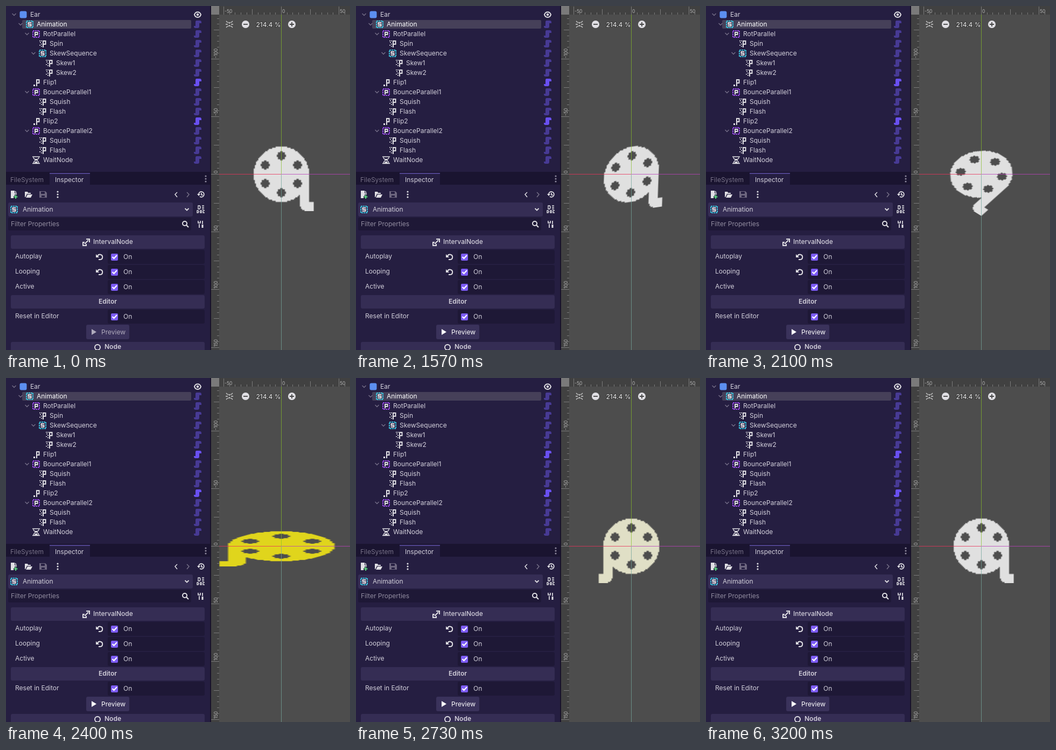
Write an HTML page with a canvas that moves like this. It is 639 by 639 pixels and loops after 4.23 s.

```html
<!DOCTYPE html>
<html>
<head>
<meta charset="utf-8">
<style>
html, body { margin: 0; width: 100%; height: 100%; overflow: hidden; background: #251e41 }
canvas, svg { position: absolute; left: 0; top: 0 }
text { font: 12px Inter, "Noto Sans", sans-serif; fill: #d3d0db; white-space: pre }
.ruler { font-size: 8.6px; fill: #b4b4b4 }
.bold { font-weight: 600 }
</style>
</head>
<body>
<canvas id="stage" width="639" height="639"></canvas>
<svg id="ui" width="639" height="639" fill="none"></svg>
<script>
const LIGHT = '#e0dfe4', BAR = '#352d54', FIELD = '#1e1836', DIM = '#767087';
const rect = (x, y, w, h, fill, r = 0) => `<rect x="${x}" y="${y}" width="${w}" height="${h}" rx="${r}" fill="${fill}"/>`;
const text = (x, y, s, attrs = '') => `<text x="${x}" y="${y + 4}" ${attrs}>${s}</text>`;
const at = (x, y, body) => `<g transform="translate(${x} ${y})">${body}</g>`;
const line = (d, color = LIGHT, w = 1.5) => `<path d="${d}" stroke="${color}" stroke-width="${w}"/>`;
const shape = (d, color = LIGHT) => `<path d="${d}" fill="${color}"/>`;
const dots = (x, y, color) => [-5, 0, 5].map(d => `<circle cx="${x}" cy="${y + d}" r="1.6" fill="${color}"/>`).join('');

// Icons, each centred on 0,0
const letterP = line('M1-6V7M1-5H5.5V1H1', LIGHT, 2);
const frame = color => `<rect x="-6" y="-6" width="12" height="12" stroke="${color}" stroke-width="2" stroke-dasharray="3 1"/>`;
const icons = {
  root: rect(-6.5, -6.5, 13, 13, '#5c8ff0', 3),
  seq: frame('#3cc3dc') + line('M3.5-3H-2.5V0H2.5V3H-3.5', LIGHT, 2),
  par: frame('#9448e0') + line('M-2-4V4.5M-2-3H2.5V1H-2', LIGHT, 2),
  tween: letterP + [[-6, -6], [-3, -6], [-5, -3], [-3, 0], [-6, 2], [-3, 4]].map(p => rect(...p, 2, 1.5, LIGHT)).join(''),
  set: letterP + rect(-5, 4, 3, 3, LIGHT),
  wait: line('M-7-6H7M-7 6.5H7') + line('M-5-5C-5-1-1-1-1 0S-5 2-5 6M5-5C5-1 1-1 1 0S5 2 5 6', LIGHT, 1.3) + shape('M-3-2H3L0 1ZM-4 6L0 2 4 6Z'),
  script: c => shape('M-2-7H4Q7-7 7-4V-2H3V4Q3 7 0 7H-4Q-7 7-7 4V3H-4V-4Q-4-7-2-7Z', c),
  eye: line('M-6 0C-4-6.5 4-6.5 6 0C4 6.5-4 6.5-6 0Z', LIGHT, 2) + `<circle r="2.3" fill="${LIGHT}"/>`,
  reset: line('M-4-1A4.7 4.7 0 1 1 1 5H-2', LIGHT, 2) + shape('M-7-5V1H-1Z'),
  chevron: (c, w) => line('M-3.5-2L0 1.5 3.5-2', c, w)
};

function tree() {
  const rows = [
    [0, 'root', 'Ear', 1], [1, 'seq', 'Animation', 1], [2, 'par', 'RotParallel', 1], [3, 'tween', 'Spin'],
    [3, 'seq', 'SkewSequence', 1], [4, 'tween', 'Skew1'], [4, 'tween', 'Skew2'], [2, 'set', 'Flip1'],
    [2, 'par', 'BounceParallel1', 1], [3, 'tween', 'Squish'], [3, 'tween', 'Flash'], [2, 'set', 'Flip2'],
    [2, 'par', 'BounceParallel2', 1], [3, 'tween', 'Squish'], [3, 'tween', 'Flash'], [2, 'wait', 'WaitNode']
  ];
  return rect(30, 26, 314, 16, '#464059', 2) + rows.map(([depth, icon, name, open], i) => {
    const x = 32 + depth * 12, y = 16 + i * 18;
    return (open ? at(x - 17, y, icons.chevron('#77718a', 1.3)) : '') + at(x, y, icons[icon])
      + text(x + 13, y, name, i == 1 ? 'style="fill:#fff"' : '')
      + at(356, y, i ? icons.script(icon == 'set' ? '#6950f2' : '#473a94') : icons.eye);
  }).join('');
}

function toolbar() {
  return rect(0, 308, 380, 24, '#1a1430') + rect(81, 310, 75, 22, '#251e41') + rect(81, 310, 75, 2, '#51448f')
    + text(8, 323, 'FileSystem', `style="fill:${DIM}"`) + text(91, 323, 'Inspector') + dots(371, 321, '#8b869b')
    + at(15, 350, shape('M-6-7H1V-2H5V0H1V3H-1V7H-6ZM2-7L5-3H2Z') + line('M3 1V8M-.5 4.5H6.5', '#5bd07b', 2.2))
    + at(42, 350, shape('M-7-5H-2L-1-3H4V-1H-3L-6 5H-7ZM-2 0H7L4 6H-5Z'))
    + at(69, 350, shape('M-7-6H4L7-3V6H-7ZM-4-5V-1H3V-5ZM-3 2V5H3V2Z', '#6d667f'))
    + dots(96, 350, LIGHT)
    + line('M318 346L314 350 318 355') + line('M336 346L340 350 336 355', DIM)
    + at(362, 350, line('M-4-1A5 5 0 1 1-2 4M1-3V1H4', LIGHT, 1.7) + shape('M-7-1H-1L-4 3Z'))
    + rect(4, 365, 343, 26, BAR, 3) + at(15, 378, icons.seq) + text(31, 378, 'Animation')
    + at(336, 378, icons.chevron(LIGHT, 1.8))
    + at(362, 378, line('M-5-7V-1H-2Q0-4-2-7ZM2-7H6M2-4H6M2-1H6', LIGHT, 1.4)
      + line('M-7 2V6H-5Q-3 4-5 2ZM1 2H-1V6H1ZM7 2H4V6H7', LIGHT, 1.4))
    + rect(4, 393, 340, 24, FIELD, 3) + text(9, 405, 'Filter Properties', 'style="fill:#928da1"')
    + at(333, 405, `<circle cx="-1" cy="-1" r="4" stroke="${LIGHT}" stroke-width="2"/>` + line('M2 2L6 6', LIGHT, 2.2))
    + at(362, 405, line('M-3 0V7M3-6V0M-5-6V-2H-1V-6', LIGHT, 1.7) + line('M3 1V7', LIGHT, 3));
}

function property(y, name, reset) {
  return text(17, y, name) + (reset ? at(174, y + 1, icons.reset) : '')
    + rect(189, y - 12, 180, 26, FIELD, 3) + rect(195, y - 5, 13, 13, '#7d5cf6', 2)
    + line(`M197.5 ${y + 1}L200.5 ${y + 4} 206 ${y - 2}`, '#fff', 2.2) + text(218, y + 1, 'On');
}

function inspector() {
  const header = y => rect(9, y, 360, 25, BAR, 3);
  return header(426) + at(149, 438, line('M-3 4L4-3M0-5H6V1', LIGHT, 2) + line('M-3 1H-6V7H0V4', LIGHT, 2))
    + text(162, 438, 'IntervalNode', 'style="font-weight:500"')
    + property(465, 'Autoplay', 1) + property(493, 'Looping', 1) + property(521, 'Active')
    + header(537) + text(189, 549, 'Editor', 'class="bold" text-anchor="middle"')
    + property(576, 'Reset in Editor')
    + rect(149, 592, 80, 27, '#3a325b', 3)
    + `<g id="preview">${shape('M159 600L168 605.5 159 611Z', 'inherit')}${text(177, 606, 'Preview', 'style="fill:inherit"')}</g>`
    + header(624) + `<circle cx="170" cy="634" r="5" stroke="${LIGHT}" stroke-width="2"/>`
    + text(183, 633, 'Node', 'class="bold"');
}

const OX = 511.5, OY = 312.5, UNIT = 2.144;

function rulers() {
  const back = '#414141', mark = '#7a7a7a';
  let out = rect(381, 0, 258, 16, back) + rect(381, 0, 15, 639, back) + rect(381, 0, 15, 16, mark);
  for (let v = -145; v <= 155; v += 5) {
    const len = v % 50 == 0 ? 15 : v % 25 == 0 ? 10 : 4;
    const x = Math.floor(OX + v * UNIT), y = Math.floor(OY + v * UNIT);
    if (x > 396 && x < 639) {
      out += rect(x, 16 - len, 1, len, mark);
      if (len == 15) out += text(x + 2, 9, v, 'class="ruler"');
    }
    if (y > 16 && y < 639) {
      out += rect(396 - len, y, len, 1, mark);
      if (len == 15) out += `<text class="ruler" transform="translate(393 ${y - 1}) rotate(-90)">${v}</text>`;
    }
  }
  return out;
}

function viewport() {
  const button = (x, d) => `<circle cx="${x}" cy="34" r="7" fill="${LIGHT}"/>` + line(d, '#444', 1.8);
  return rect(396, 312, 115, 1, 'rgba(232,50,90,.8)') + rect(512, 312, 127, 1, 'rgba(185,65,185,.8)')
    + rect(511, 16, 1, 296, 'rgba(135,190,40,.7)') + rect(511, 312, 1, 327, 'rgba(115,165,155,.75)') + rulers()
    + at(415, 34, line('M-6-6L-3-3M6-6L3-3M-6 6L-3 3M6 6L3 3', '#d0d0d0', 1.3)
      + line('M-2-4L0-2 2-4M-2 4L0 2 2 4M-7 0H-3M3 0H7', '#d0d0d0', 1.3))
    + button(445, 'M441 34H449') + button(531, 'M527 34H535M531 30V38')
    + text(487.5, 35, '214.4 %', 'text-anchor="middle" style="fill:#f2f2f2;stroke:#333;stroke-width:2;paint-order:stroke"');
}

document.getElementById('ui').innerHTML =
  tree() + toolbar() + inspector() + rect(379, 0, 2, 639, '#181229') + viewport();

// Pixel sprite of the film reel, 64 x 64 with its pivot in the middle
const sprite = document.createElement('canvas');
sprite.width = sprite.height = 64;
const pen = sprite.getContext('2d');
const holes = [[0, -16], [14, -8], [14, 8], [0, 16], [-14, 8], [-14, -8]];

function inReel(x, y) {
  if (holes.some(([hx, hy]) => Math.hypot(x - hx, y - hy) < 3.7)) return false;
  if (Math.hypot(x, y) < 24) return true;
  if (y < 0 || y > 32 || x < 16) return false;
  if (y < 24) return x < 24;
  return x < 28 && (x > 22 || y < 26 || Math.hypot(x - 22, y - 26) < 6);
}

function paintSprite(color) {
  pen.clearRect(0, 0, 64, 64);
  pen.fillStyle = color;
  for (let y = 0; y < 64; y++)
    for (let x = 0; x < 64; x++)
      if (inReel(x - 31.5, y - 31.5)) pen.fillRect(x, y, 1, 1);
}

const LOOP = 4230, HOVER = 770, SPIN = 1396, SPIN_LEN = 980, BOUNCE = 2395, BOUNCE_LEN = 500, REST = 3200;
const ctx = document.getElementById('stage').getContext('2d');
const preview = document.getElementById('preview');
const cubicInOut = p => p < .5 ? 4 * p ** 3 : 1 - 4 * (1 - p) ** 3;

function pose(t) {
  const p = { angle: 0, skew: 0, sx: 1, sy: 1, flash: 0 };
  const spin = (t - SPIN) / SPIN_LEN, bounce = (t - BOUNCE) / BOUNCE_LEN;
  if (spin > 0 && spin < 1) {
    p.angle = -2 * Math.PI * cubicInOut(spin);
    p.skew = 29 * Math.PI / 180 * (1 - Math.abs(2 * spin - 1));
  } else if (bounce >= 0 && t < REST) {
    const step = bounce % 1, squish = 2 ** (-10 * step);
    p.sx = (1 + squish) * (bounce < 1 ? -1 : 1);
    p.sy = 1 - squish / 2;
    p.flash = 1 - Math.sin(step * Math.PI / 2);
  }
  return p;
}

function draw(now) {
  const t = now % LOOP, { angle, skew, sx, sy, flash } = pose(t);
  preview.setAttribute('fill', t < HOVER ? '#b0abbd' : '#fff');
  paintSprite(`rgb(224,${224 - 11 * flash},${224 - 200 * flash})`);
  ctx.setTransform(1, 0, 0, 1, 0, 0);
  ctx.fillStyle = '#4d4d4d';
  ctx.fillRect(381, 0, 258, 639);
  const kx = sx * UNIT, ky = sy * UNIT, tilt = angle + skew;
  ctx.setTransform(kx * Math.cos(angle), kx * Math.sin(angle), -ky * Math.sin(tilt), ky * Math.cos(tilt), OX, OY);
  ctx.drawImage(sprite, -32, -32);
  requestAnimationFrame(draw);
}
requestAnimationFrame(draw);
</script>
</body>
</html>
```
